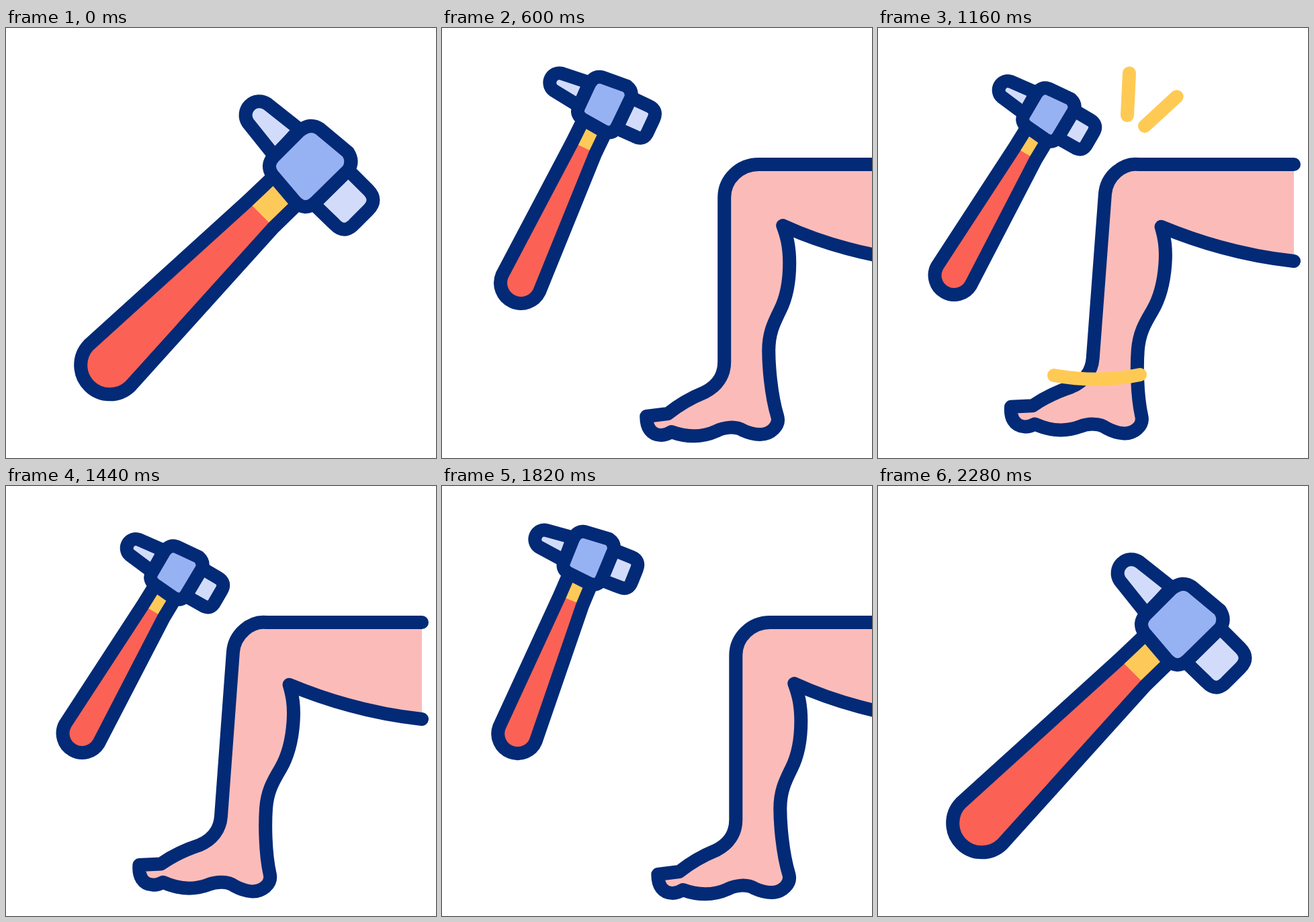
An HTML page that plays this animation: 640x640 px, repeating every 2400 ms.

```html
<!DOCTYPE html>
<html lang="en">
<head>
<meta charset="utf-8">
<title>Knee reflex</title>
<style>
html, body { margin: 0; height: 100%; overflow: hidden; background: #fff; }
svg { display: block; width: 100vw; height: 100vh; }
path { stroke-linecap: round; stroke-linejoin: round; }
.ink { stroke: #032a76; }
.spark { fill: none; stroke: #ffca54; stroke-width: 20; }
</style>
</head>
<body>
<svg viewBox="0 0 640 640">
  <defs>
    <path id="handle" d="M398,221 L359,258 L123,472 A43.5,43.5 0 0 0 185,533 L398,297 L435,261"/>
  </defs>
  <g id="leg">
    <path id="skin" fill="#fbbcb9"/>
    <path id="outline" class="ink" fill="none" stroke-width="20"/>
  </g>
  <g id="hammer">
    <use href="#handle" fill="#fb6255"/>
    <path fill="#fdca5a" d="M359,257 L398,221 L435,261 L398,296Z"/>
    <use href="#handle" class="ink" fill="none"/>
    <path class="ink" fill="#d2dcfa" d="M437,151 L389,113 A20.5,20.5 0 0 0 360,141 L400,191Z"/>
    <path class="ink" fill="#d2dcfa" d="M509,211 L539,241 Q554,256 539,271 L519,291 Q504,308 489,292 L458,262Z"/>
    <path class="ink" fill="#97b2f3" d="M437,153 L398,192 Q387,204 396,218 L430,258 Q445,274 461,259 L509,212 Q518,199 509,185 L467,150 Q453,140 437,153Z"/>
  </g>
  <path class="spark" pathLength="1" d="M371,130 L375,47"/>
  <path class="spark" pathLength="1" d="M397,146 L460,88"/>
  <path class="spark" pathLength="1" d="M390,516 Q328,529 262,517"/>
</svg>
<script>
const LOOP = 2400, KICK = 20, KNEE = [400, 262];
const $ = id => document.getElementById(id);
const sparks = [...document.querySelectorAll('.spark')];

// Lower leg: everything here turns about the knee
const shin = 'C360,203 337,225 337,252 L337,497 C337,517 326,533 308,542 ' +
  'C286,551 268,562 253,574 L221,578 C221,595 228,606 243,606 C250,606 255,603 258,601 ' +
  'C280,609 303,610 325,600 C337,594 354,592 365,599 C376,604 383,605 390,605 ' +
  'C406,605 420,592 416,578 C406,545 403,500 403,480 C403,455 410,440 420,420 ' +
  'C429,402 434,378 434,350 C434,325 430,310 424,294';

const ramp = (t, a, b) => Math.min(1, Math.max(0, (t - a) / (b - a)));
const smooth = (t, a, b) => { const u = ramp(t, a, b); return u * u * (3 - 2 * u); };

// cubic-bezier(.5, 0, .5, 1)
function ease(t, a, b) {
  const x = ramp(t, a, b);
  let lo = 0, hi = 1;
  for (let i = 0; i < 20; i++) {
    const s = (lo + hi) / 2;
    if (1.5 * s * (1 - s) + s ** 3 < x) lo = s; else hi = s;
  }
  return lo * lo * (3 - 2 * lo);
}

function turn(path, degrees) {
  const r = degrees * Math.PI / 180, c = Math.cos(r), s = Math.sin(r);
  return path.replace(/(\d+),(\d+)/g, (_, x, y) => {
    x -= KNEE[0]; y -= KNEE[1];
    return (KNEE[0] + x * c - y * s).toFixed(2) + ',' + (KNEE[1] + x * s + y * c).toFixed(2);
  });
}

function drawLeg(t) {
  const away = 434 * (1 - smooth(Math.min(t, LOOP - t), 98, 797));
  const angle = KICK * (smooth(t, 1102, 1300) - smooth(t, 1300, 1500));
  const d = 'M619,203 L388,203 ' + turn(shin, angle) + ' C485,322 555,340 619,347';
  $('skin').setAttribute('d', d + 'Z');
  $('outline').setAttribute('d', d);
  $('leg').setAttribute('transform', `translate(${away})`);
}

function drawHammer(t) {
  const p = ease(t, 140, 760) - ease(t, 1740, 2280);
  const swing = -9 * (smooth(t, 380, 700) - smooth(t, 760, 1080)
    + smooth(t, 1480, 1780) - smooth(t, 1800, 2120));
  const scale = 1 - .338 * p;
  $('hammer').setAttribute('transform', `rotate(${swing},88,385) ` +
    `translate(${152 - 40 * p},${504 - 134 * p}) rotate(${-14.7 * p}) scale(${scale}) translate(-152,-504)`);
  $('hammer').setAttribute('stroke-width', 20 / scale);
}

function drawSparks(t) {
  const burst = 1 - (1 - ramp(t, 1080, 1240)) ** 2;
  const from = smooth(t, 1320, 1420);
  sparks.forEach((el, i) => {
    const to = i < 2 ? burst : ramp(t, 1080, 1160);
    el.style.display = to > from ? '' : 'none';
    el.style.strokeDasharray = `${to - from} 2`;
    el.style.strokeDashoffset = -from;
  });
}

const start = performance.now();
function frame() {
  const t = (performance.now() - start) % LOOP;
  drawLeg(t);
  drawHammer(t);
  drawSparks(t);
  requestAnimationFrame(frame);
}
frame();
</script>
</body>
</html>
```
